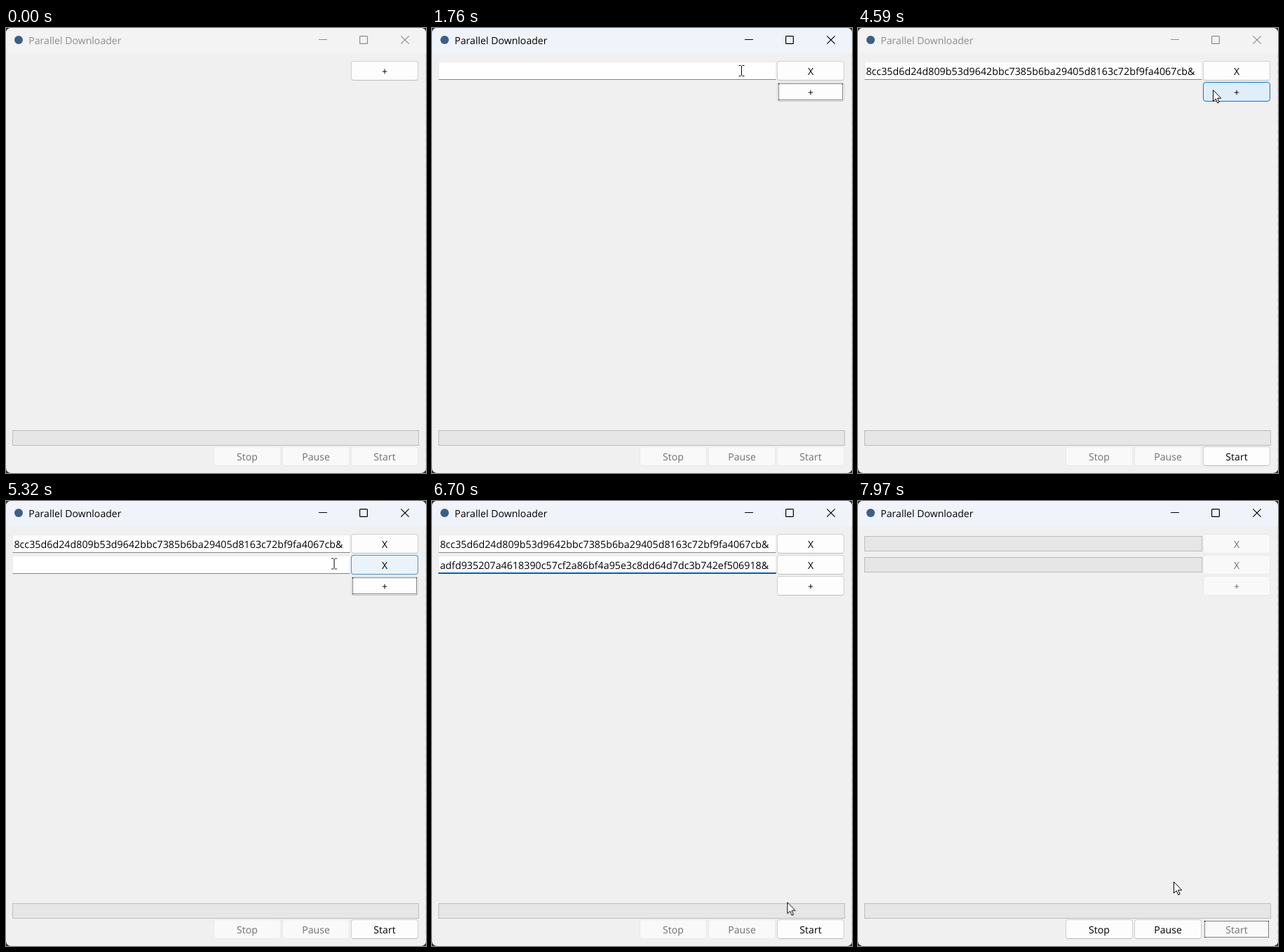
Write an HTML page that moves like this. It is 599 by 635 pixels and loops after 7.99 s.

```html
<!DOCTYPE html>
<html lang="en">
<head>
<meta charset="utf-8">
<title>Parallel Downloader</title>
<style>
:root {
  --loop: 7.99s;
  --face: #fdfdfd;  --edge: #d0d0d0 #d0d0d0 #bcbcbc;
  --hot: #e0eef9;   --hotEdge: #0078d4;
  --down: #cce4f7;  --downEdge: #005499;
  --dim: #f9f9f9;   --dimEdge: #e9e9e9;  --dimText: #707070;
}
html, body { margin: 0; width: 100%; height: 100%; overflow: hidden; background: #2f2f2f; }
div, svg { position: absolute; box-sizing: border-box; }
.win {
  inset: 0; overflow: hidden; border-radius: 7px; background: #f0f0f0; color: #000;
  font: 14.1px/19px "Open Sans", "Noto Sans", sans-serif;
  text-rendering: geometricPrecision; white-space: nowrap;
}
.side {
  right: 0; top: 36px; bottom: 0; width: 1px;
  background: repeating-linear-gradient(#dadada 0 7px, #ececec 7px 12px);
}
[class] { animation-duration: var(--loop); animation-iteration-count: infinite; animation-timing-function: linear; }
.step { animation-timing-function: step-end; }

/* title bar */
.bar { left: 0; top: 0; width: 100%; height: 36px; animation-name: active; }
.bar span { position: absolute; left: 32.3px; top: 9px; }
.bar svg { left: 0; top: 0; }
.icon { left: 12px; top: 11px; width: 12px; height: 12px; border-radius: 50%; background: #3c5f88; }

/* widgets */
.btn {
  width: 96px; height: 28px; padding-top: 5px; text-align: center;
  background: var(--face); border: 1px solid; border-color: var(--edge); border-radius: 4px;
}
.c1 { left: 296px; } .c2 { left: 394px; } .c3 { left: 492px; }
.foot { top: 597px; }
.ring { inset: 1px; border: 1px dotted #000; opacity: 0; }
.row { left: 0; width: 100%; height: 30px; }
.r1 { top: 47px; animation-name: showRow1; }
.r2 { top: 77px; animation-name: showRow2; }
.row .btn { top: 0; }
.field {
  left: 9px; top: 1px; width: 482px; height: 26px; background: #fff;
  border: 1px solid #ebebeb; border-bottom-color: #868686; font-size: 14.29px;
  animation-name: untilStart;
}
.field span { position: absolute; left: 1.4px; top: 4px; }
.focus { left: -1px; right: -1px; bottom: -1px; height: 2px; background: #005fb8; }
.caret { width: 1px; height: 20px; top: 2px; background: #000; }
.prog { left: 9px; height: 22px; background: #e6e6e6; border: 1px solid #bcbcbc; }
.row .prog { top: 3px; width: 482px; animation-name: afterStart; }
.total { top: 574px; width: 580px; }

.plus { top: 47px; animation-name: plus, drop; animation-timing-function: linear, step-end; }
.plus .ring { animation-name: plusRing; }
.x1 { animation-name: x1; } .x2 { animation-name: x2; }
.start { animation-name: start; }
.start .ring { animation-name: startRing; }
.ctl { animation-name: control; }
.r1 .focus { animation-name: focus1; } .r2 .focus { animation-name: focus2; }
.r1 span { animation-name: paste1; }   .r2 span { animation-name: paste2; }
.r1 .caret { animation-name: caret1; } .r2 .caret { animation-name: caret2; }

.mouse { left: 0; top: 0; width: 0; height: 0; animation-name: move; }
.mouse svg { overflow: visible; left: 0; top: 0; width: 1px; height: 1px; }
.arrow { animation-name: arrow; } .beam { animation-name: beam; }

@keyframes active {
  0% { background: #f3f3f3; color: #8c8c8c; }
  12.14% { background: #f0f3f9; color: #000; }
  44.56% { background: #f3f3f3; color: #8c8c8c; }
  61.7%, 100% { background: #f0f3f9; color: #000; }
}
@keyframes plus {
  0%, 7.76%, 14.14%, 38.17%, 41.18%, 55.32%, 63.58%, 96.62% {
    background: var(--face); border-color: var(--edge); color: #000; }
  9.76%, 12.13%, 39.3%, 41.17%, 57.32%, 61.69% {
    background: var(--hot); border-color: var(--hotEdge); color: #000; }
  12.14%, 14.13%, 61.7%, 63.57% {
    background: var(--down); border-color: var(--downEdge); color: #000; }
  98.5%, 100% { background: var(--dim); border-color: var(--dimEdge); color: var(--dimText); }
}
@keyframes drop {
  0% { transform: none; }
  14.14% { transform: translateY(30px); }
  63.58%, 100% { transform: translateY(60px); }
}
@keyframes plusRing {
  0%, 24.66%, 71.34%, 100% { opacity: 0; }
  14.14%, 63.58% { opacity: 1; }
}
@keyframes x1 {
  0%, 14.14%, 19%, 96.62% { background: var(--face); border-color: var(--edge); color: #000; }
  16%, 17.31% { background: var(--hot); border-color: var(--hotEdge); color: #000; }
  98.5%, 100% { background: var(--dim); border-color: var(--dimEdge); color: var(--dimText); }
}
@keyframes x2 {
  0%, 63.58%, 67.9%, 96.62% { background: var(--face); border-color: var(--edge); color: #000; }
  65%, 65.91% { background: var(--hot); border-color: var(--hotEdge); color: #000; }
  98.5%, 100% { background: var(--dim); border-color: var(--dimEdge); color: var(--dimText); }
}
@keyframes start {
  0%, 31.91% { background: var(--dim); border-color: var(--dimEdge); color: var(--dimText); }
  34.4%, 85.4% { background: var(--face); border-color: var(--edge); color: #000; }
  88.36%, 94.87% { background: var(--hot); border-color: var(--hotEdge); color: #000; }
  95.6%, 96.61% { background: var(--down); border-color: var(--downEdge); color: #000; }
  98.5%, 100% { background: var(--dim); border-color: var(--dimEdge); color: var(--dimText); }
}
@keyframes startRing { 0% { opacity: 0; } 95%, 100% { opacity: 1; } }
@keyframes control {
  0%, 96.62% { background: var(--dim); border-color: var(--dimEdge); color: var(--dimText); }
  98.5%, 100% { background: var(--face); border-color: var(--edge); color: #000; }
}
@keyframes showRow1 { 0% { opacity: 0; } 14.14%, 100% { opacity: 1; } }
@keyframes showRow2 { 0% { opacity: 0; } 63.58%, 100% { opacity: 1; } }
@keyframes untilStart { 0% { opacity: 1; } 96.62%, 100% { opacity: 0; } }
@keyframes afterStart { 0% { opacity: 0; } 96.62%, 100% { opacity: 1; } }
@keyframes focus1 { 0%, 44.56%, 100% { opacity: 0; } 24.66% { opacity: 1; } }
@keyframes focus2 { 0% { opacity: 0; } 71.34%, 100% { opacity: 1; } }
@keyframes paste1 { 0% { opacity: 0; } 31.91%, 100% { opacity: 1; } }
@keyframes paste2 { 0% { opacity: 0; } 75.97%, 100% { opacity: 1; } }
@keyframes caret1 {
  0%, 44.56%, 100% { opacity: 0; left: 2px; }
  24.66% { opacity: 1; left: 2px; }
  31.91% { opacity: 1; left: 471px; }
}
@keyframes caret2 {
  0%, 78.8%, 100% { opacity: 0; left: 2px; }
  71.34% { opacity: 1; left: 2px; }
  75.97% { opacity: 1; left: 471px; }
}
@keyframes move {
  0% { transform: translate(602px, 62px); }
  6.26% { transform: translate(602px, 62px); animation-timing-function: ease-out; }
  9.76%, 15.64% { transform: translate(520px, 70px); }
  18.52% { transform: translate(470px, 64px); }
  21.9%, 22.1% { transform: translate(441px, 61px); }
  24.03%, 24.66% { transform: translate(432px, 59px); }
  27.03%, 35.67% { transform: translate(430px, 54px); }
  39.16% { transform: translate(560px, 88px); }
  39.17% { transform: translate(602px, 84px); }
  54.19% { transform: translate(602px, 84px); animation-timing-function: ease-out; }
  57.44%, 57.7% { transform: translate(506px, 88px); }
  58.45% { transform: translate(505px, 88px); }
  65.08% { transform: translate(505px, 88px); animation-timing-function: ease-out; }
  71.34%, 72.33% { transform: translate(403px, 92px); }
  72.34% { transform: translate(404px, 93px); }
  75.97% { transform: translate(404px, 93px); animation-timing-function: ease-in; }
  79.2% { transform: translate(458px, 220px); }
  79.4% { transform: translate(458px, 220px); animation-timing-function: ease-out; }
  85.48%, 86.36% { transform: translate(512px, 613px); }
  88.36%, 94.62% { transform: translate(514px, 619px); }
  96.62% { transform: translate(514px, 619px); animation-timing-function: ease-in-out; }
  99.6%, 100% { transform: translate(450px, 543px); }
}
@keyframes arrow { 0%, 37.26%, 76.47%, 100% { opacity: 1; } 17.31%, 65.91% { opacity: 0; } }
@keyframes beam { 0%, 37.26%, 76.47%, 100% { opacity: 0; } 17.31%, 65.91% { opacity: 1; } }
</style>
</head>
<body>
<div class="win">
  <div class="side"></div>
  <div class="bar step">
    <div class="icon"></div>
    <span>Parallel Downloader</span>
    <svg width="599" height="36" fill="none" stroke="currentColor" stroke-width="1.2">
      <path d="M446 16.5h12M563.3 11.3l11.4 11.4M574.7 11.3l-11.4 11.4"/>
      <rect x="504.6" y="11.6" width="10.8" height="10.8" rx="1"/>
    </svg>
  </div>

  <div class="row r1 step">
    <div class="field step">
      <span class="step">8cc35d6d24d809b53d9642bbc7385b6ba29405d8163c72bf9fa4067cb&amp;</span>
      <div class="focus step"></div><div class="caret step"></div>
    </div>
    <div class="prog step"></div>
    <div class="btn c3 x1">X</div>
  </div>
  <div class="row r2 step">
    <div class="field step">
      <span class="step">adfd935207a4618390c57cf2a86bf4a95e3c8dd64d7dc3b742ef506918&amp;</span>
      <div class="focus step"></div><div class="caret step"></div>
    </div>
    <div class="prog step"></div>
    <div class="btn c3 x2">X</div>
  </div>
  <div class="btn c3 plus">+<div class="ring step"></div></div>

  <div class="prog total"></div>
  <div class="btn c1 foot ctl">Stop</div>
  <div class="btn c2 foot ctl">Pause</div>
  <div class="btn c3 foot start">Start<div class="ring step"></div></div>

  <div class="mouse">
    <svg class="arrow step"><path d="M.5.5v16l3.7-3.4 2.6 5.9 2.4-1-2.6-5.8h5.1z" fill="#fff" stroke="#000"/></svg>
    <svg class="beam step"><path d="M-3.5-7.5h3M1.5-7.5h3M.5-7v14M-3.5 7.5h3M1.5 7.5h3" fill="none" stroke="#000"/></svg>
  </div>
</div>
</body>
</html>
```
